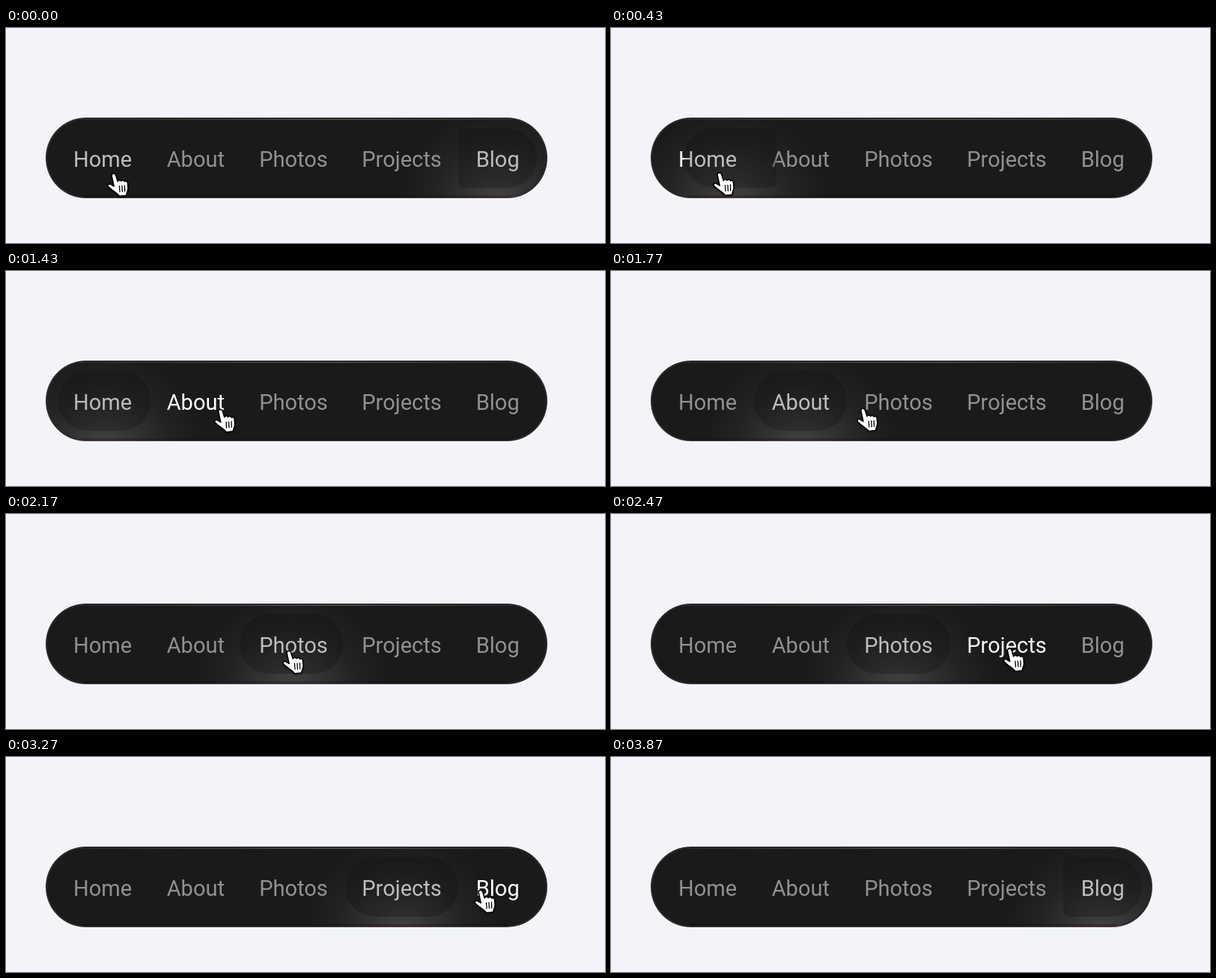
Recreate the animation shown at these times as an HTML page. Size 800 by 288 pixels, loop 5130 ms.

```html
<!DOCTYPE html>
<html lang="en">
<head>
<meta charset="utf-8">
<title>Navigation bar</title>
<style>
  html, body { margin: 0; width: 100%; height: 100%; overflow: hidden; background: #f2f4fa; }
  svg { display: block; width: 800px; height: 288px; }
  text { font: 400 29px Roboto, "Open Sans", sans-serif; text-anchor: middle; }
  #hand { filter: drop-shadow(0 1px 1px rgba(0, 0, 0, .45)); }
</style>
</head>
<body>
<svg viewBox="0 0 800 288">
  <defs>
    <radialGradient id="light" gradientUnits="userSpaceOnUse" cx="0" cy="238" r="132">
      <stop offset="0" stop-color="#fff" stop-opacity=".19"/>
      <stop offset=".3" stop-color="#fff" stop-opacity=".115"/>
      <stop offset=".65" stop-color="#fff" stop-opacity=".04"/>
      <stop offset="1" stop-color="#fff" stop-opacity="0"/>
    </radialGradient>
    <radialGradient id="rim" gradientUnits="userSpaceOnUse" cx="0" cy="228" r="110">
      <stop offset="0" stop-color="#c06a86" stop-opacity=".2"/>
      <stop offset="1" stop-color="#c06a86" stop-opacity="0"/>
    </radialGradient>
    <linearGradient id="sheen">
      <stop offset="0" stop-color="#fff" stop-opacity=".05"/>
      <stop offset=".6" stop-color="#fff" stop-opacity=".28"/>
      <stop offset="1" stop-color="#fff" stop-opacity=".05"/>
    </linearGradient>
    <clipPath id="outer"><rect x="53" y="120" width="670" height="108" rx="54"/></clipPath>
    <clipPath id="inner"><rect x="55" y="122" width="666" height="104" rx="52"/></clipPath>
  </defs>
  <rect width="800" height="288" fill="#f2f4fa"/>
  <g clip-path="url(#outer)">
    <rect x="53" y="120" width="670" height="108" fill="#2b282b"/>
    <rect id="rimGlow" x="-110" y="225" width="220" height="3" fill="url(#rim)"/>
  </g>
  <g clip-path="url(#inner)">
    <rect x="55" y="122" width="666" height="104" fill="#1a1a1a"/>
    <rect id="glow" x="-135" y="104" width="270" height="124" fill="url(#light)"/>
    <rect x="90" y="122" width="596" height="1" fill="url(#sheen)"/>
    <rect x="100" y="224.5" width="576" height="1.5" fill="#000" opacity=".4"/>
  </g>
  <g id="labels"></g>
  <path id="pill" fill="#0e0e0e" fill-opacity=".27"/>
  <g id="hand">
    <path d="M-1 2.4C-1-.4 3.4-1 4.4 1.6L7.2 10.4C8 8.4 11 8.4 12 10.2C13 8.4 15.8 8.8 16.5 10.8
      C17.8 9.6 20 10.2 20.4 12.4L21 19.5C21.2 23 19.2 25 18.6 29.2L9.4 30.2C8 27 .2 23-5.4 17.6
      C-7 15.2-4.6 13.2-2.2 14.4L2.2 17Z" fill="#fff" stroke="#000" stroke-width="1.5" stroke-linejoin="round"/>
    <path d="M9.4 16.6L10 24.4M12.9 16.3L13.4 24.2M16.4 16L16.7 23.8" stroke="#000" stroke-width="1.3" stroke-linecap="round"/>
  </g>
</svg>
<script>
const LOOP = 5130, SLIDE = 250, FADE = 200;
const $ = id => document.getElementById(id);

// left/right: item box, mid: label centre, on: hover time, click: selection time
const items = [
  { name: "Home", left: 67, right: 191, mid: 129, on: -50, click: 255 },
  { name: "About", left: 191, right: 315, mid: 253.3, on: 850, click: 1422 },
  { name: "Photos", left: 315, right: 453, mid: 384, on: 1775, click: 1968 },
  { name: "Projects", left: 453, right: 604, mid: 528.5, on: 2340, click: 2858 },
  { name: "Blog", left: 604, right: 709, mid: 656.7, on: 3085, click: 3512 }
];

// pointer tip: time, x, y
const path = [
  [0, 142, 195], [110, 145, 199], [260, 143, 194], [570, 143, 194], [700, 145, 190.5],
  [1000, 284, 186], [1215, 284, 186], [1245, 284.6, 185.5], [1590, 284.6, 185.5],
  [1930, 376, 183.5], [2190, 376, 183.5], [2470, 530.5, 180.5], [2530, 530.5, 180.5],
  [2700, 537, 180.5], [2930, 537, 180.5], [3260, 632, 178.5], [3370, 634, 178.5],
  [3570, 634, 178.5], [3870, 806, -36]
];

const clamp = v => Math.max(0, Math.min(1, v));
const mix = (a, b, k) => a + (b - a) * k;
const smooth = k => k * k * (3 - 2 * k);
const bez = (a, b, s) => 3 * a * s * (1 - s) ** 2 + 3 * b * s * s * (1 - s) + s ** 3;

// cubic-bezier(.25, .1, .25, 1)
function ease(x) {
  if (x <= 0 || x >= 1) return clamp(x);
  let lo = 0, hi = 1;
  for (let i = 0; i < 24; i++) {
    const s = (lo + hi) / 2;
    if (bez(.25, .25, s) < x) lo = s; else hi = s;
  }
  return bez(.1, 1, lo);
}

for (const it of items) {
  it.el = document.createElementNS("http://www.w3.org/2000/svg", "text");
  it.el.textContent = it.name;
  it.el.setAttribute("x", it.mid);
  it.el.setAttribute("y", 185.5);
  $("labels").append(it.el);
}

function lit(i, t) {
  const next = items[i + 1];
  const off = next ? next.click : items[0].click + LOOP;
  return ease((t - items[i].on) / FADE) * (1 - ease((t - off) / FADE));
}

function shape(l, r, rl, rr) {
  const top = 134, bottom = 214;
  return `M${l + rl} ${top}H${r - rr}A${rr} ${rr} 0 0 1 ${r} ${top + rr}V${bottom - rr}` +
    `A${rr} ${rr} 0 0 1 ${r - rr} ${bottom}H${l + rl}A${rl} ${rl} 0 0 1 ${l} ${bottom - rl}` +
    `V${top + rl}A${rl} ${rl} 0 0 1 ${l + rl} ${top}Z`;
}

function pointer(t) {
  const i = path.findIndex(p => p[0] > t);
  if (i < 0) return null;
  const a = path[i - 1], b = path[i];
  const k = smooth((t - a[0]) / (b[0] - a[0]));
  return [mix(a[1], b[1], k), mix(a[2], b[2], k)];
}

function draw(t) {
  let cur = items.length - 1;
  while (cur >= 0 && items[cur].click > t) cur--;
  const started = cur < 0 ? -LOOP : items[cur].click;
  if (cur < 0) cur = items.length - 1;
  const to = items[cur], from = items[(cur + items.length - 1) % items.length];
  const k = ease((t - started) / SLIDE);
  const l = mix(from.left, to.left, k), r = mix(from.right, to.right, k);
  $("pill").setAttribute("d", shape(l, r, cur === items.length - 1 ? 8 : 40, cur === 0 ? 8 : 40));

  const shift = `translate(${(l + r) / 2} 0)`;
  $("glow").setAttribute("transform", shift);
  $("rimGlow").setAttribute("transform", shift);

  items.forEach((it, i) => {
    const c = Math.round(mix(145, 255, Math.max(lit(i, t), lit(i, t + LOOP))));
    it.el.setAttribute("fill", `rgb(${c},${c},${c})`);
  });

  const p = pointer(t);
  $("hand").style.display = p ? "" : "none";
  if (p) $("hand").setAttribute("transform", `translate(${p[0]} ${p[1]})`);
}

const start = performance.now();
function tick(now) {
  draw(Math.max(0, now - start) % LOOP);
  requestAnimationFrame(tick);
}
draw(0);
requestAnimationFrame(tick);
</script>
</body>
</html>
```
